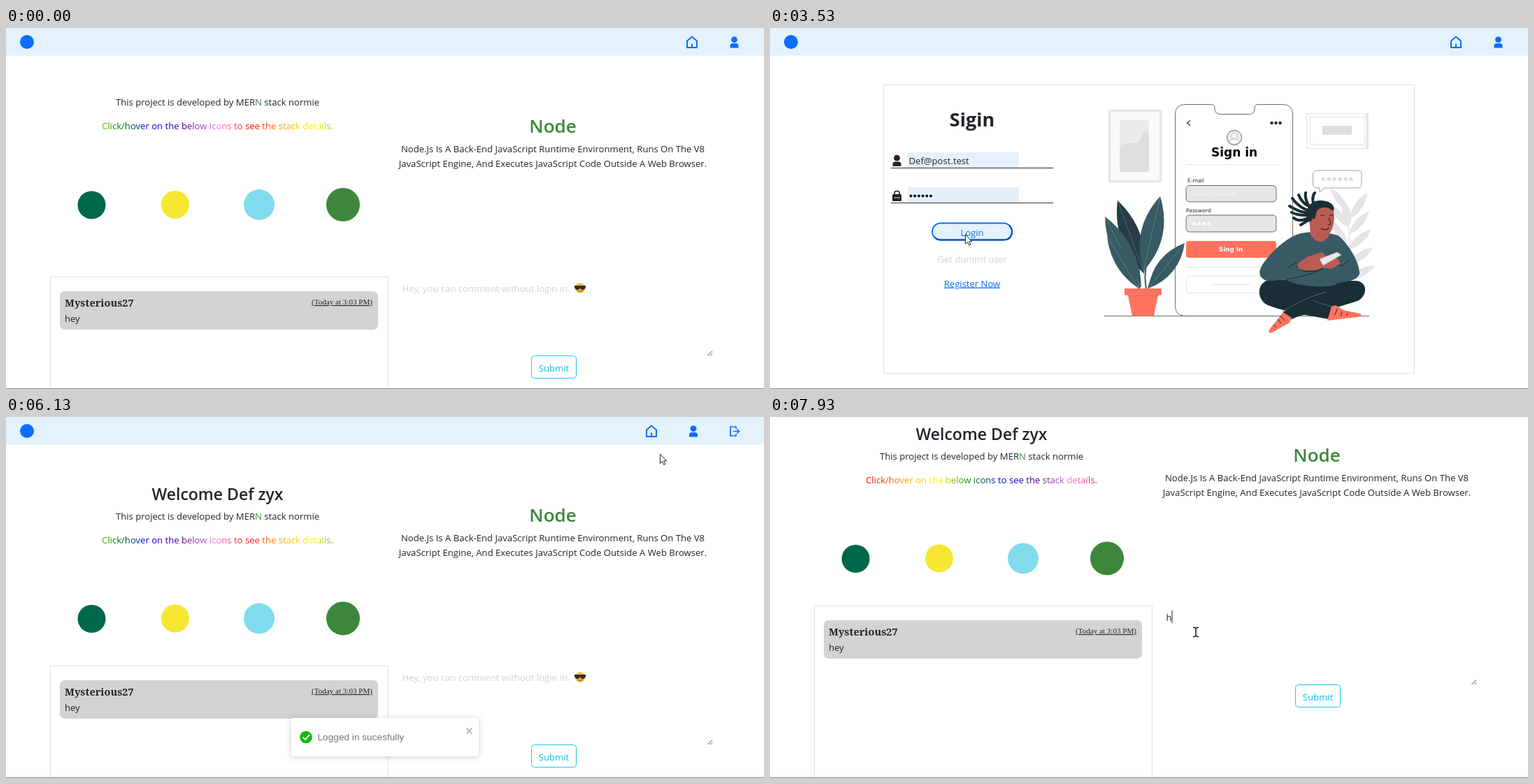
Recreate the animation shown at these times as an HTML page. Size 1084 by 517 pixels, loop 8000 ms.

```html
<!DOCTYPE html>
<html lang="en">
<head>
<meta charset="utf-8">
<title>Stack demo</title>
<style>
  html, body { margin: 0; width: 100%; height: 100%; overflow: hidden; background: #fff; }
  svg { display: block; }
  text { font: 13.1px "Open Sans", "Noto Sans", sans-serif; fill: #212529; white-space: pre; }
  .mid { text-anchor: middle; }
  .blue { fill: #0d6efd; }
  .pale { fill: #d3d3d3; }
  .hint { fill: #757575; }
  .node { fill: #3c873a; }
  .h2 { font-size: 26px; font-weight: 600; }
  .h3 { font-size: 23px; font-weight: 600; }
  .sign { font-size: 27px; font-weight: 700; }
  .author { font: 700 14.6px "Noto Serif", serif; }
  .time { font: 11.1px "Liberation Serif", serif; text-decoration: underline; }
  .link { text-decoration: underline; }
  .toast { font: 13.66px "Liberation Sans", sans-serif; fill: #757575; }
  .status { font-size: 9.9px; fill: #fff; }
  .art text { font: 7.6px "DejaVu Sans", sans-serif; }
  .art .bold { font-weight: 700; }
  .line { fill: none; stroke: #dee2e6; }
  .gray { fill: none; stroke: #e4e4e4; }
  .ink { fill: none; stroke: #3f4a4e; stroke-width: .8; }
  .icon { fill: none; stroke: #0d6efd; stroke-width: 2; }
  .teal { fill: #375a64; }
  .dark { fill: #1a2e35; }
  .coral { fill: #ff725e; }
  .skin { fill: #bb5c53; }
</style>
</head>
<body>
<svg width="1084" height="517" viewBox="0 0 1084 517">
  <defs>
    <linearGradient id="rainbow" gradientUnits="userSpaceOnUse" x1="137" x2="468" y1="0" y2="0" spreadMethod="repeat"></linearGradient>
    <g id="house"><path class="icon" d="M-7-2L0-8 7-2V7.500H-7ZM0 8V2"/></g>
    <g id="person"><circle cy="-3.800" r="4.400"/><path d="M-6 8V5Q-6 1.500-2.500 1.500H2.500Q6 1.500 6 5V8Z"/></g>
    <g id="arrow"><path d="M.5 0V13.500L3.500 10.700 5.700 15.500 7.900 14.500 5.700 9.900H9.700Z" fill="#fff" stroke="#222"/></g>
    <g id="hand"><path d="M-1.400.8C-.6-.4 1.400-.2 1.400 1.600V6C5 6 8.500 7 8.500 10 8.500 13 7 14 7 17.500H.5C-.5 15-3.500 12.500-4.500 9.800-4.500 8-2.500 8.300-1.400 9.700Z" fill="#fff" stroke="#222"/><path d="M3.500 6.500V9M6 7.200V9.500" stroke="#222" stroke-width=".8"/></g>
    <g id="beam"><path d="M-4-6.500H-1.500L0-5.500 1.500-6.500H4M-4 6.500H-1.500L0 5.500 1.500 6.500H4M0-6V6" fill="none" stroke="#111" stroke-width="1.500"/></g>
  </defs>

  <g id="page">
    <rect width="1084" height="39.500" fill="#e3f2fd"/>
    <circle class="blue" cx="30" cy="20" r="10"/>
    <use id="navHome" href="#house" y="20.500"/>
    <use id="navUser" href="#person" class="blue" y="20.500"/>
    <path id="navExit" class="icon" d="M1044 17V14H1036V27H1044V24M1040 20.500H1048M1045.500 17.500L1048.500 20.500 1045.500 23.500" style="stroke-width:1.700"/>

    <g id="home">
      <text id="welcome" class="mid h3" x="302.500" y="119">Welcome Def zyx</text>
      <g id="intro">
        <text class="mid" x="302.500" y="111">This project is developed by MER<tspan class="node">N</tspan> stack normie</text>
        <text class="mid" x="302.500" y="145" style="fill:url(#rainbow)">Click/hover on the below icons to see the stack details.</text>
        <circle cx="122.500" cy="253.500" r="20" fill="#00684a"/>
        <circle cx="242" cy="253" r="20" fill="#f7e733"/>
        <circle cx="362" cy="253" r="22" fill="#80dcec"/>
        <circle cx="482" cy="253" r="24" fill="#3c873a"/>
      </g>
      <text class="mid h2 node" x="782" y="149.500">Node</text>
      <text class="mid" x="782" y="178">Node.Js Is A Back-End JavaScript Runtime Environment, Runs On The V8</text>
      <text class="mid" x="782" y="199">JavaScript Engine, And Executes JavaScript Code Outside A Web Browser.</text>
      <rect class="line" x="63.500" y="356.500" width="483" height="400"/>
      <rect class="pale" x="77" y="377" width="455" height="55" rx="7"/>
      <text class="author" x="84" y="399">Mysterious27</text>
      <text x="84" y="421">hey</text>
      <text class="time" x="437" y="396">(Today at 3:03 PM)</text>
      <g id="placeholder">
        <text class="pale" x="566.500" y="377.500">Hey, you can comment without login in.</text>
        <circle cx="821" cy="372.500" r="7.300" fill="#f9bd35"/>
        <path d="M813 369H829V371Q828 375 824.500 375 822 375 821 371.500 820 375 817.500 375 814 375 813 371Z" fill="#2b2b35"/>
        <path d="M818 376.500Q822 378.500 825 375.800" fill="none" stroke="#7a4a12"/>
      </g>
      <text id="typed" x="566.500" y="377.500">h</text>
      <rect id="caret" y="363" width="1" height="18" fill="#222"/>
      <path d="M1003.500 469L1010 462.500M1007.500 469L1010 466.500" stroke="#444"/>
      <rect x="751.500" y="469.500" width="64" height="32" rx="4" fill="none" stroke="#25c4ea"/>
      <text class="mid" x="783.500" y="491.500" style="fill:#14bde6">Submit</text>
    </g>

    <g id="login">
      <rect class="line" x="162.500" y="81.500" width="759" height="413"/>
      <text class="mid sign" x="289" y="140.500">Sigin</text>
      <path d="M173 200.500H405M173 250.500H405" stroke="#333"/>
      <use href="#person" x="181.500" y="190" fill="#212529"/>
      <rect x="175" y="238" width="13" height="10" rx="1.500" fill="#212529"/>
      <path d="M178 238V236Q178 233.500 181.500 233.500T185 236V238" fill="none" stroke="#212529" stroke-width="1.600"/>
      <path d="M178 243H186" stroke="#fff" stroke-width="1.500" stroke-dasharray="1.500 1.500"/>
      <g id="empty">
        <text class="hint" x="198.500" y="194.500">E-mail</text>
        <text class="hint" x="198.500" y="245">E-mail</text>
      </g>
      <g id="filled">
        <path d="M197 178H356V200H197ZM197 228H356V250H197Z" fill="#e6f0fd"/>
        <text x="198.500" y="194.500">Def@post.test</text>
        <path d="M201.500 240.500H232" stroke="#111" stroke-width="4" stroke-linecap="round" stroke-dasharray="0 5.700"/>
      </g>
      <rect x="232" y="279.500" width="114" height="24" rx="12" fill="#e3f2fd" stroke="#0d6efd" stroke-width="2"/>
      <path id="bevel" d="M236 300Q239 303.500 244 303.500H334Q346 303.500 346 291.500 346 286 342 283" fill="none" stroke="#0a4db4" stroke-width="2"/>
      <text class="mid blue" x="289" y="297.500">Login</text>
      <text class="mid pale" x="289.500" y="335.500">Get dummt user</text>
      <text class="mid blue link" x="289" y="370.500">Register Now</text>

      <g class="art">
        <rect x="485.500" y="118.500" width="73" height="101" fill="#fafafa" stroke="#e6e6e6" stroke-width="3.500"/>
        <path d="M500 132H542V206H500Z" fill="#ebebeb"/>
        <path d="M500 174Q507 163 517 165T531 155 542 152V206H500Z" fill="#dedede"/>
        <path class="gray" d="M767.500 122.500H855.500V172.500H767.500ZM772.500 127.500H850.500V167.500H772.500ZM767 122L772 127M855 122L850 127M767 172L772 167M855 172L850 167"/>
        <path class="gray" stroke-width="3" d="M854 122V172"/>
        <rect x="790" y="140" width="42" height="13" fill="#dedede"/>
        <path class="ink" d="M478 412.500H857"/>
        <path class="ink" d="M594 109.500H631Q636 109.500 636 115 636 123.500 644 123.500H685Q693 123.500 693 115 693 109.500 698 109.500H733Q747.500 109.500 747.500 124V398Q747.500 412.500 733 412.500H594Q579.500 412.500 579.500 398V124Q579.500 109.500 594 109.500Z" style="fill:#fff"/>
        <path d="M601 132.500L596.500 136 601 139.500" fill="none" stroke="#263238" stroke-width="1.300"/>
        <path d="M717.500 136H731" stroke="#263238" stroke-width="4.600" stroke-linecap="round" stroke-dasharray="0 6"/>
        <circle class="ink" cx="664" cy="157" r="10.500" style="fill:#ececec"/>
        <path d="M657 164Q658 159 664 159T671 164Q664 168.500 657 164Z" fill="#fff" stroke="#aaa" stroke-width=".7"/>
        <circle cx="664" cy="154.500" r="4.300" fill="#f7f7f7" stroke="#aaa" stroke-width=".7"/>
        <text class="mid bold" x="664" y="184" style="font-size:17px;fill:#000">Sign in</text>
        <path class="gray" d="M595 195.500H728M595 342.500H728M632 367.500H687"/>
        <text x="597" y="221">E-mail</text>
        <text x="595" y="264">Password</text>
        <rect class="ink" x="595" y="225.500" width="129" height="23.500" rx="5" style="fill:#e6e6e6"/>
        <rect class="ink" x="595" y="268" width="129" height="24" rx="5" style="fill:#e6e6e6"/>
        <text x="604" y="239.500" style="fill:#f8f8f8">name@mail.test</text>
        <path d="M606.500 280H629" stroke="#fff" stroke-width="4.500" stroke-linecap="round" stroke-dasharray="0 7"/>
        <rect class="coral" x="595" y="305" width="129" height="24" rx="4"/>
        <text class="mid bold" x="659" y="319.500" style="font-size:8.800px;fill:#fff">Sing in</text>
        <rect class="gray" x="595.500" y="355.500" width="128" height="24" rx="5"/>
        <path d="M782 204H840Q846 204 846 210V223Q846 229 840 229H793L786 235V229H782Q776.500 229 776.500 223V210Q776.500 204 782 204Z" fill="#fff" stroke="#888" stroke-width=".8"/>
        <path d="M791 216.500H832" stroke="#dedede" stroke-width="5.500" stroke-linecap="round" stroke-dasharray="0 8"/>
        <g id="leaves"></g>
        <path class="coral" d="M507 373H560V382.500H507ZM512 383H555L549 412.500H518Z"/>
        <path d="M511 383H556" stroke="#c9503f"/>

        <path d="M778 258Q762 254 756 239M774 260Q764 246 766 236M778 254Q774 242 779 236M772 262Q757 258 747 244M771 265Q757 264 743 255M770 268Q756 269 746 264M772 271Q757 279 749 272M772 274Q765 278 759 282" fill="none" stroke="#1a2e35" stroke-width="4" stroke-linecap="round"/>
        <path class="dark" d="M716 360C694 364 696 390 712 397 735 406 770 412 800 417L808 401 842 390C855 382 855 362 836 362Z"/>
        <path class="dark" d="M842 390C810 402 770 406 746 417L733 407C750 399 770 387 790 377Z"/>
        <path d="M733 406Q765 386 795 378M808 400Q790 396 776 390" fill="none" stroke="#5d737a" stroke-width=".8"/>
        <path class="coral" d="M734 407L746 415 743 422 718 436Q712 438 714 432ZM803 399L809 397 820 404 844 409Q848 412 840 414L797 419Z"/>
        <path d="M726 417L731 423M730 412L736 419M720 425L724 429M811 402L808 411M818 406L816 413M826 408L825 412" stroke="#1a2e35"/>
        <path class="teal" d="M753 296C735 303 712 325 702 343 696 356 706 364 720 362L738 360C745 368 790 374 808 368 812 362 838 366 843 352 844 335 824 305 812 297 795 292 770 290 753 296Z"/>
        <path class="skin" d="M771 272L773 296Q786 316 800 297L798 285Z"/>
        <path class="skin" d="M770 256C780 245 804 247 806 262 809 280 803 297 793 299 780 298 772 285 770 270Z"/>
        <path class="dark" d="M768 276C764 252 778 244 795 248 804 250 808 256 806 262 797 255 787 256 782 262L778 278Z"/>
        <circle class="skin" cx="778" cy="277" r="4"/>
        <path d="M787 269Q790 267 793 269M800 269Q803 267 805 269M799 272L802 281 798 282M788 287Q794 291 800 286" fill="none" stroke="#3b2020" stroke-width="1.100"/>
        <path class="skin" d="M754 338L768 328 789 321 795 326 804 327 814 332 815 338 803 345 790 343 780 347 758 347Z"/>
        <path d="M786 331L811 321 817 325 791 340Z" fill="#e8e8e8" stroke="#bbb" stroke-width=".7"/>
        <path d="M753 336L740 343M758 346Q770 352 792 345M738 360Q766 356 785 347M812 340Q823 341 828 332" fill="none" stroke="#1a2e35"/>
      </g>
    </g>
  </g>

  <g id="toast">
    <rect x="408" y="431" width="268" height="55" rx="3" fill="#fff" style="filter:drop-shadow(0 1px 4px #0003)"/>
    <circle cx="429" cy="458.500" r="8.800" fill="#07bc0c"/>
    <path d="M424.500 458.500L428 462 434 455" fill="none" stroke="#fff" stroke-width="2"/>
    <text class="toast" x="445.500" y="463">Logged in sucesfully</text>
    <path d="M658.500 445.500L666.500 453.500M666.500 445.500L658.500 453.500" stroke="#aaa" stroke-width="1.700"/>
  </g>
  <g id="status">
    <path d="M0 498H362Q365 498 365 501V517H0Z" fill="#202124"/>
    <text id="address" class="status" x="3" y="511"></text>
  </g>
  <path d="M0 516.500H1084" stroke="#85888f"/>
  <use id="cursor"/>
</svg>
<script>
const $ = id => document.getElementById(id);
const show = (id, on) => { $(id).style.display = on ? '' : 'none'; };
const shift = (id, y) => $(id).setAttribute('transform', `translate(0 ${y})`);
const clamp = v => Math.min(1, Math.max(0, v));
const smooth = v => { v = clamp(v); return v * v * (3 - 2 * v); };

const colors = ['red', 'orange', 'yellow', 'green', 'blue', 'indigo', 'violet', 'red'];
$('rainbow').innerHTML = colors.map((c, i) => `<stop offset="${i / 7}" stop-color="${c}"/>`).join('');

// A pointed leaf from base (x, y) to tip (u, v), w wide, with a thin midrib.
function leaf(x, y, u, v, w, fill) {
  const len = Math.hypot(u - x, v - y);
  const nx = (y - v) / len * w, ny = (u - x) / len * w;
  const mx = (x + u) / 2, my = (y + v) / 2;
  return `<path d="M${x} ${y}Q${mx + nx} ${my + ny} ${u} ${v}Q${mx - nx} ${my - ny} ${x} ${y}Z" fill="${fill}"/>
    <path d="M${x} ${y}L${u} ${v}" stroke="#fff" stroke-opacity=".25" stroke-width=".8"/>`;
}
let foliage = '<path d="M815 380Q838 320 822 250" fill="none" stroke="#e4e4e4" stroke-width="1.5"/>';
for (let i = 0; i < 5; i++) {
  const y = 362 - i * 22, x = 823 + i * 1.5;
  foliage += leaf(x, y, 866 - i * 3, y - 22 - i * 4, 11, '#e4e4e4')
    + leaf(x, y - 10, 797 + i, y - 45, 10, '#e4e4e4');
}
foliage += leaf(828, 285, 821, 248, 12, '#e4e4e4')
  + '<path d="M528 373Q530 335 520 320M538 373Q532 340 550 310M541 373Q548 345 570 325" fill="none" stroke="#375a64" stroke-width="2"/>'
  + leaf(535, 352, 497, 247, 28, '#263d46')
  + leaf(531, 372, 479, 270, 27, '#375a64')
  + leaf(527, 373, 482, 298, 20, '#375a64')
  + leaf(534, 348, 558, 241, 31, '#375a64')
  + leaf(541, 373, 593, 308, 24, '#375a64');
$('leaves').innerHTML = foliage;

// time, hot spot x and y, pointer shape from then on
const track = [
  [67, 1080, 500, 'arrow'], [870, 960, 106, 'arrow'], [1000, 960, 106, 'arrow'],
  [1400, 988, 26, 'hand'], [1730, 995, 14, 'hand'], [1867, 1032, 18, 'hand'],
  [2460, 1032, 18, 'arrow'], [3260, 279, 297, 'hand'], [3520, 279, 297, 'arrow'],
  [3730, 269, 187, 'beam'], [3860, 271, 187, 'arrow'], [4130, 293, 313, 'hand'],
  [4260, 293, 317, 'hand'], [4470, 293, 330, 'hand'], [4660, 293, 330, 'hand'],
  [4870, 295, 288, 'hand'], [5460, 295, 288, 'arrow'], [5930, 935, 53, 'arrow'],
  [6130, 935, 53, 'arrow'], [6600, 589, 283, 'arrow'], [7000, 589, 283, 'arrow'],
  [7330, 609, 308, 'beam'], [8000, 609, 308, 'beam']
];
function moveCursor(t) {
  const next = track.findIndex(k => k[0] > t);
  show('cursor', next > 0);
  if (next < 1) return;
  const [t0, x0, y0, shape] = track[next - 1], [t1, x1, y1] = track[next];
  const p = smooth((t - t0) / (t1 - t0));
  $('cursor').setAttribute('href', '#' + shape);
  $('cursor').setAttribute('transform', `translate(${x0 + (x1 - x0) * p} ${y0 + (y1 - y0) * p})`);
}

function render(t) {
  const onLogin = t >= 2120 && t < 5390, member = t >= 5390, typed = t >= 7790;
  show('login', onLogin);
  show('home', !onLogin);
  show('welcome', member);
  show('navExit', member);
  $('navHome').setAttribute('x', member ? 923 : 981);
  $('navUser').setAttribute('x', member ? 983 : 1041.5);
  shift('intro', member ? 35.5 : 0);
  shift('page', -Math.round(86 * smooth((t - 6619) / 267)));

  const phase = member ? 208 + (t - 6133) * .257 : 213 + t * .257;
  $('rainbow').setAttribute('gradientTransform', `translate(${phase % 331} 0)`);

  show('empty', t < 2660);
  show('filled', t >= 2660);
  $('bevel').setAttribute('transform', t >= 5120 ? 'rotate(180 289 291.5)' : '');

  show('placeholder', !typed);
  show('typed', typed);
  show('caret', typed || t >= 6590 && (t - 6590) % 1000 < 500);
  $('caret').setAttribute('x', typed ? 574.5 : 566.5);

  show('status', t >= 1330 && t < 2590);
  $('address').textContent = t < 1800 ? 'localhost:3000' : 'localhost:3000/login';

  show('toast', member && t < 7330);
  const rise = clamp((t - 5390) / 500);
  shift('toast', 90 * (1 - rise) ** 2 - 10 * Math.sin(rise * Math.PI) * rise);
  $('toast').style.opacity = 1 - clamp((t - 7130) / 200);
  moveCursor(t);
}

// The picture is held at 15 steps per second.
const start = performance.now();
function tick() {
  const ms = (performance.now() - start) % 8000;
  render(Math.floor((ms + 6) * .015) / .015);
  requestAnimationFrame(tick);
}
tick();
</script>
</body>
</html>
```
